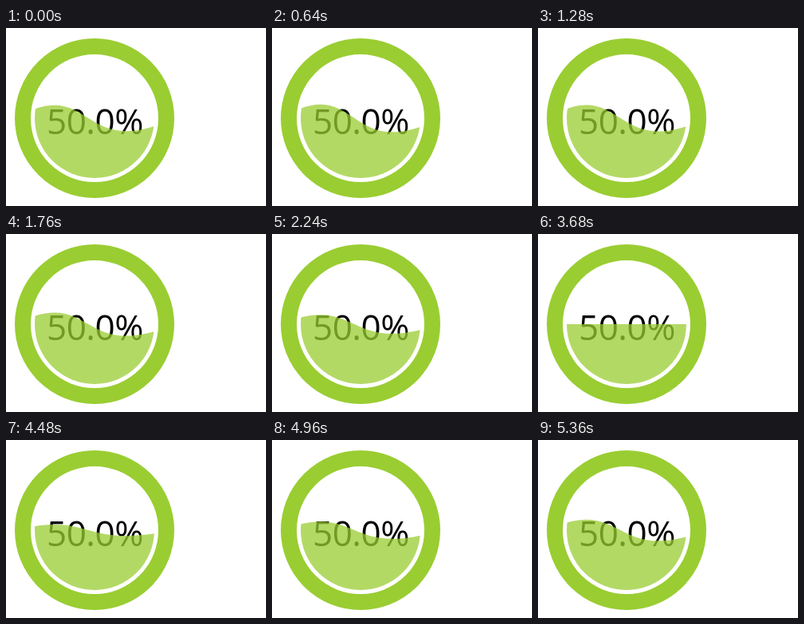
Animation, 326 px wide and 223 px high, one loop 5440 ms. Source, as an HTML page:

```html
<!DOCTYPE html>
<html>
<head>
<meta charset="utf-8">
<style>
  html, body { margin: 0; width: 100%; height: 100%; overflow: hidden; background: #fff; }
  svg { display: block; }
  text { font: 44px "Open Sans", "Noto Sans", sans-serif; letter-spacing: -.5px; text-anchor: middle; }
</style>
</head>
<body>
<svg width="326" height="223" viewBox="0 0 326 223">
  <clipPath id="bowl"><circle cx="111" cy="113" r="75"/></clipPath>
  <circle cx="111" cy="113" r="90" fill="none" stroke="#9acd32" stroke-width="20"/>
  <text x="111.5" y="133">50.0%</text>
  <path id="water" clip-path="url(#bowl)" fill="#9acd32" fill-opacity=".75"/>
</svg>
<script>
  const LOOP = 5440, STEP = 80;
  const SWING = 3000, CREST = 680; // ms from crest to calm, time of the crest
  const LEVEL = 113, HEIGHT = 60;
  const water = document.getElementById('water');

  // The wave slows at its crest and bounces back sharply from flat.
  function waveHeight(t) {
    return HEIGHT * Math.abs(Math.cos((t - CREST) / SWING * Math.PI / 2));
  }

  function draw() {
    const t = Math.floor(performance.now() % LOOP / STEP) * STEP;
    const h = waveHeight(t);
    water.setAttribute('d',
      `M11 ${LEVEL}C111 ${LEVEL - h} 91 ${LEVEL + h} 211 ${LEVEL}V213H11Z`);
    requestAnimationFrame(draw);
  }
  draw();
</script>
</body>
</html>
```
